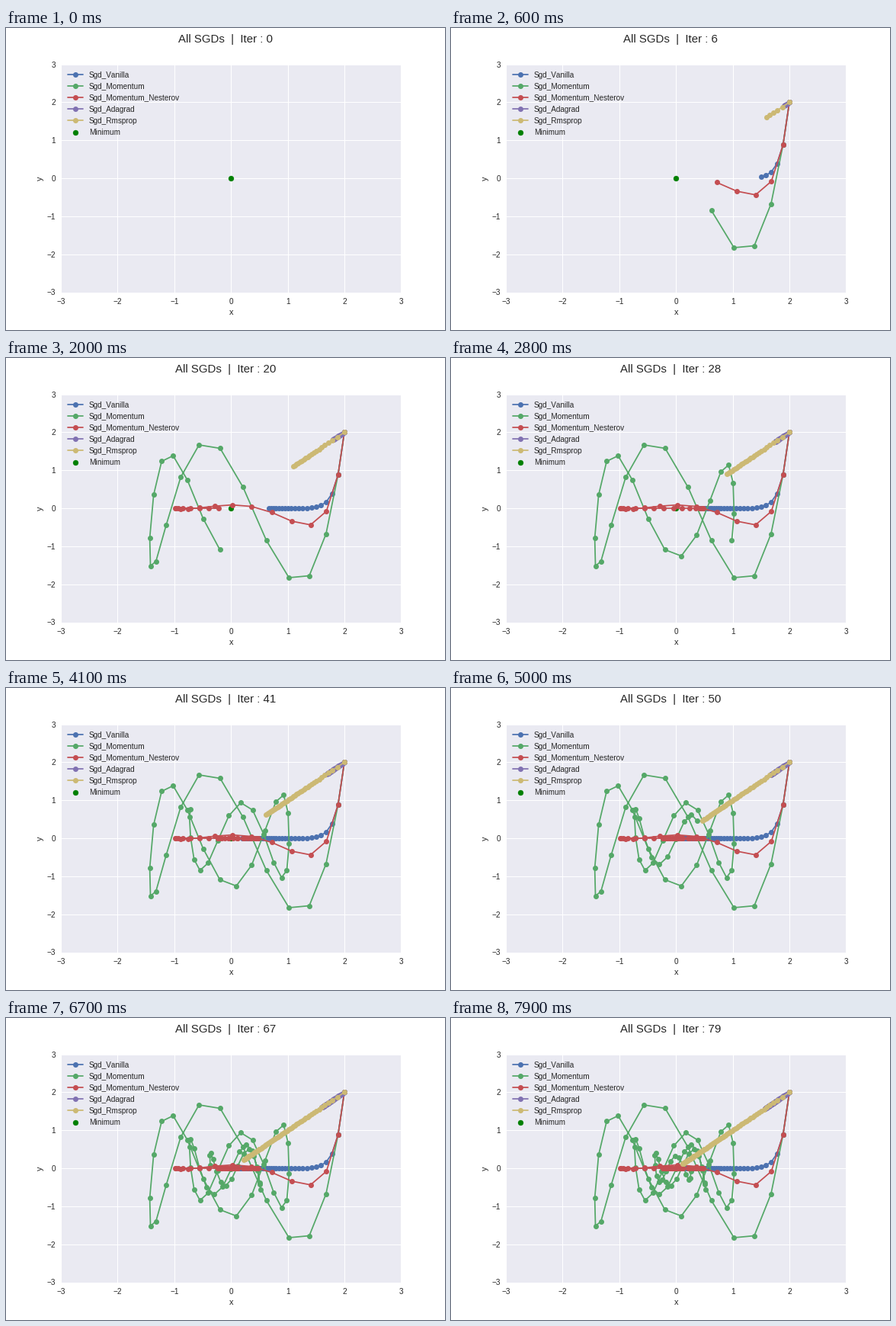
Write a matplotlib script that moves like this. It is 576x396 px and loops after 8 s.

```python
import numpy as np
import matplotlib.pyplot as plt
from matplotlib.animation import FuncAnimation

plt.style.use("seaborn-v0_8")
plt.rcParams.update({
    "font.family": "Liberation Sans",
    "text.kerning_factor": 6,
    "figure.subplot.bottom": 0.125,
})

STEPS = 80
START = (2.0, 2.0)
RATE, ADA_RATE, DECAY = 0.28, 0.028, 0.95
EPS = 1e-8


def grad(p):
    """Gradient of x^2 / 10 + y^2."""
    return p * np.array([0.2, 2.0])


def vanilla(p, s):
    return p - RATE * grad(p), s


def momentum(p, v):
    v = DECAY * v - RATE * grad(p)
    return p + v, v


def nesterov(p, v):
    v = DECAY * v - RATE * grad(p + DECAY * v)
    return p + v, v


def adagrad(p, cache):
    g = grad(p)
    cache = cache + g ** 2
    return p - ADA_RATE * g / (np.sqrt(cache) + EPS), cache


def rmsprop(p, cache):
    g = grad(p)
    cache = DECAY * cache + (1 - DECAY) * g ** 2
    return p - ADA_RATE * g / (np.sqrt(cache) + EPS), cache


def descend(step):
    p, state = np.array(START), np.zeros(2)
    path = [p]
    for _ in range(STEPS - 1):
        p, state = step(p, state)
        path.append(p)
    return np.array(path)


METHODS = [
    ("Sgd_Vanilla", vanilla, "#4C72B0"),
    ("Sgd_Momentum", momentum, "#55A868"),
    ("Sgd_Momentum_Nesterov", nesterov, "#C44E52"),
    ("Sgd_Adagrad", adagrad, "#8172B2"),
    ("Sgd_Rmsprop", rmsprop, "#CCB974"),
]

fig, ax = plt.subplots(figsize=(8, 5.5), dpi=72)
title = fig.suptitle("", fontsize=15)
ax.set(xlim=(-3, 3), ylim=(-3, 3), xlabel="x", ylabel="y")

paths = [descend(step) for _, step, _ in METHODS]
lines = [ax.plot([], [], "o-", color=color, label=name)[0]
         for name, _, color in METHODS]
ax.scatter([0], [0], color="green", label="Minimum")
ax.legend(loc="upper left")


def update(i):
    title.set_text(f"All SGDs  |  Iter : {i}")
    for line, path in zip(lines, paths):
        line.set_data(path[:i, 0], path[:i, 1])
    return [title, *lines]


anim = FuncAnimation(fig, update, frames=STEPS, interval=100,
                     repeat=True, repeat_delay=0, blit=False)
plt.show()
```
